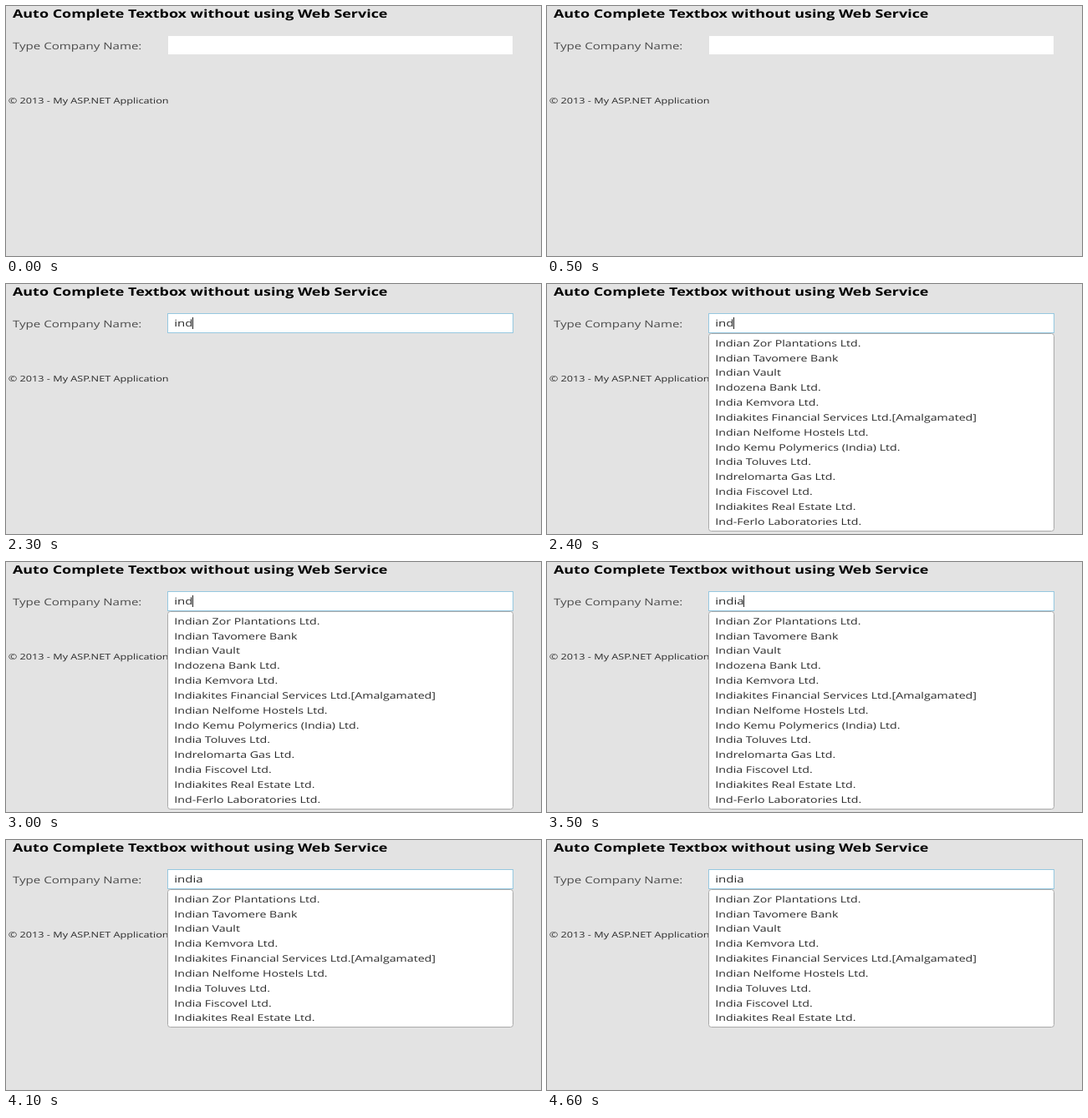
An HTML page for the animation above (4700 ms loop, 640 by 300 pixels).

```html
<!DOCTYPE html>
<html lang="en">
<head>
<meta charset="utf-8">
<title>Auto Complete Textbox</title>
<style>
  html, body { margin: 0; width: 100%; height: 100%; overflow: hidden; background: #e3e3e3; }
  svg { display: block; width: 100%; height: 100%; }
  text { font-family: "Open Sans", "Noto Sans", sans-serif; white-space: pre; text-rendering: geometricPrecision; }
</style>
</head>
<body>
<svg id="stage" viewBox="0 0 640 300"></svg>
<script>
const LOOP = 4700;
const FLAT = 0.76;      // the page is shown flatter than it was laid out
const ROW = 17.83;
const LEFT = 201.3;

const companies = [
  'Indian Zor Plantations Ltd.',
  'Indian Tavomere Bank',
  'Indian Vault',
  'Indozena Bank Ltd.',
  'India Kemvora Ltd.',
  'Indiakites Financial Services Ltd.[Amalgamated]',
  'Indian Nelfome Hostels Ltd.',
  'Indo Kemu Polymerics (India) Ltd.',
  'India Toluves Ltd.',
  'Indrelomarta Gas Ltd.',
  'India Fiscovel Ltd.',
  'Indiakites Real Estate Ltd.',
  'Ind-Ferlo Laboratories Ltd.'
];

// [start time, value]
const typing = [[0, ''], [2000, 'i'], [2200, 'in'], [2300, 'ind'], [3400, 'indi'], [3500, 'india']];
const queries = [[0, ''], [2400, 'ind'], [3700, 'india']];
const caretOn = [
  [0, false], [800, true], [1300, false], [1800, true], [2700, false], [3000, true],
  [3200, false], [3400, true], [4000, false], [4300, true], [4600, false]
];
const FOCUS = 800;

const stage = document.getElementById('stage');

function add(tag, attrs, parent = stage) {
  const el = document.createElementNS('http://www.w3.org/2000/svg', tag);
  for (const key in attrs) el.setAttribute(key, attrs[key]);
  parent.appendChild(el);
  return el;
}

function label(str, x, y, size, fill, parent = stage, weight = 400) {
  const el = add('text', {
    transform: `translate(${x} ${y}) scale(1 ${FLAT})`,
    'font-size': size, 'font-weight': weight, fill
  }, parent);
  el.textContent = str;
  return el;
}

function at(track, t) {
  let value = track[0][1];
  for (const [start, v] of track) if (t >= start) value = v;
  return value;
}

function show(el, on) {
  el.setAttribute('visibility', on ? 'visible' : 'hidden');
}

add('rect', { width: 640, height: 300, fill: '#e3e3e3' });
label('Auto Complete Textbox without using Web Service', 8, 14, 17.92, '#000', stage, 700);
label('Type Company Name:', 8, 52, 15.07, '#4c4c4c');
label('© 2013 - My ASP.NET Application', 2.8, 117, 12.67, '#2a2a2a');

add('rect', { x: 194, y: 36, width: 412, height: 22, fill: '#fff' });
const ring = add('rect', { x: 193.5, y: 35.5, width: 413, height: 23, fill: 'none', stroke: '#96c8e0' });
const entry = label('', LEFT, 51, 15, '#2a2a2a');
const caret = add('rect', { y: 40, width: 1, height: 14, fill: '#222' });

const menu = add('g', {});
const panel = add('rect', { x: 193.5, y: 59.5, width: 413, rx: 3, fill: '#fff', stroke: '#aaa' }, menu);
const rows = companies.map((_, i) => label('', LEFT, 74.8 + i * ROW, 14.2, '#2a2a2a', menu));

function drawMenu(query) {
  show(menu, query);
  if (!query) return;
  const hits = companies.filter(name => name.toLowerCase().startsWith(query));
  panel.setAttribute('height', Math.round(hits.length * ROW + 5));
  rows.forEach((row, i) => { row.textContent = hits[i] || ''; });
}

let lastQuery = null;
let lastValue = null;

function render(t) {
  const value = at(typing, t);
  if (value !== lastValue) {
    entry.textContent = value;
    const end = LEFT + (value ? entry.getComputedTextLength() : 0);
    caret.setAttribute('x', Math.floor(end));
    lastValue = value;
  }
  const query = at(queries, t);
  if (query !== lastQuery) {
    drawMenu(query);
    lastQuery = query;
  }
  show(ring, t >= FOCUS);
  show(caret, at(caretOn, t));
}

const begin = performance.now();
function tick(now) {
  render(Math.max(0, now - begin) % LOOP);
  requestAnimationFrame(tick);
}
render(0);
requestAnimationFrame(tick);
</script>
</body>
</html>
```
